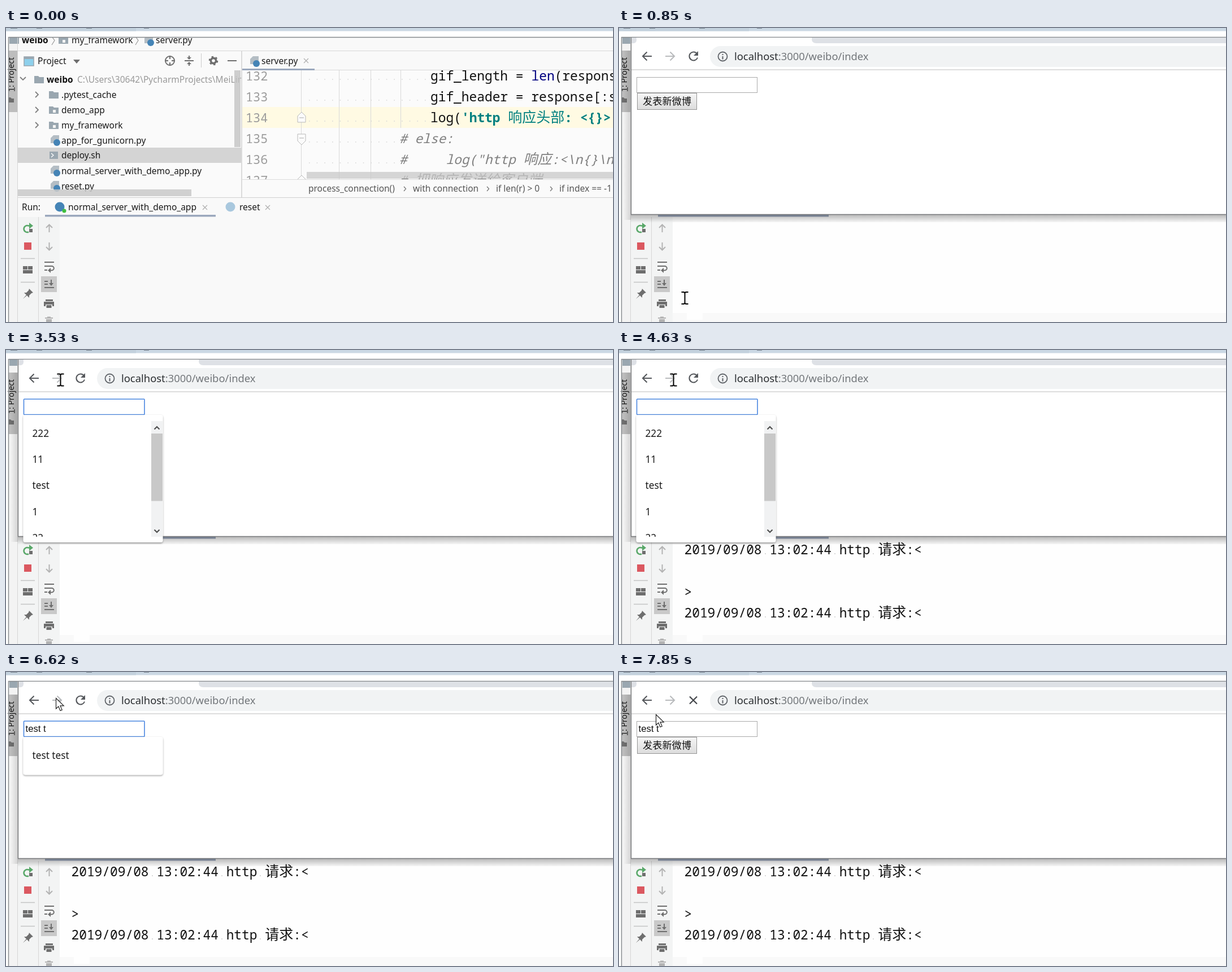
Recreate the animation shown at these times as an HTML page. Size 1074 by 521 pixels, loop 8000 ms.

```html
<!DOCTYPE html>
<html lang="zh">
<head>
<meta charset="utf-8">
<title>Server demo</title>
<style>
html, body { margin: 0; width: 100%; height: 100%; overflow: hidden; background: #fff; }
svg { display: block; width: 100vw; height: 100vh; }
text { white-space: pre; font-family: "Noto Sans", "Noto Sans CJK SC", "Noto Sans CJK", sans-serif; font-size: 15.5px; }
.mono { font-family: "Noto Sans Mono", "DejaVu Sans Mono", monospace; font-size: 22.85px; }
.cjk { font-family: "Noto Sans CJK SC", "Noto Sans CJK", sans-serif; font-weight: 300; }
.field { font-family: "Liberation Sans", Arial, sans-serif; font-size: 16.7px; }
</style>
</head>
<body>
<svg id="stage" viewBox="0 0 1074 521" xmlns="http://www.w3.org/2000/svg"></svg>
<script>
const LOOP = 8000;
const esc = s => s.replace(/&/g, '&amp;').replace(/</g, '&lt;').replace(/>/g, '&gt;');
const rect = (x, y, w, h, fill, more = '') =>
  `<rect x="${x}" y="${y}" width="${w}" height="${h}" fill="${fill}" ${more}/>`;
const text = (x, y, s, fill = '#1a1a1a', more = '') =>
  `<text x="${x}" y="${y}" fill="${fill}" ${more}>${esc(s)}</text>`;
const line = (d, color, w = 1, more = '') =>
  `<path d="${d}" fill="none" stroke="${color}" stroke-width="${w}" ${more}/>`;
const shape = (d, fill) => `<path d="${d}" fill="${fill}"/>`;
const dot = (x, y, r, fill) => `<circle cx="${x}" cy="${y}" r="${r}" fill="${fill}"/>`;

// Monospaced run in which CJK glyphs take their own wider advance.
function mono(x, y, s, fill, more = '') {
  return s.split(/([\u4e00-\u9fff]+)/).map(part => {
    const wide = /[\u4e00-\u9fff]/.test(part);
    const out = part && text(x, y, part, fill, wide
      ? `class="cjk" style="font-size:25px" ${more}` : `class="mono" ${more}`);
    x += part.length * (wide ? 25 : 13.71);
    return out;
  }).join('');
}

const GREY = '#6e6e6e', TREE = '#9aa7b0', BLUE = '#4584b6';
const folder = (x, y, mark) =>
  shape(`M${x} ${y - 6}h7l2 2h8v11h-17z`, TREE) + (mark ? rect(x + 7, y, 5, 5, '#f4f4f4') : '');
const pyFile = (x, y) => shape(`M${x + 5} ${y - 9}h10v14h-15v-9z`, '#b4bdc4') + dot(x + 11, y + 4, 6, BLUE);
const chevron = (x, y) => line(`M${x - 3} ${y - 5}l5 5-5 5`, '#808080', 1.8);
const close = (x, y) => line(`M${x - 4} ${y - 4}l8 8m0-8l-8 8`, '#b0b0b0', 1.3);

function topBar() {
  return rect(0, 0, 1074, 5.5, '#cbd8e4') + rect(0, 0, 230, 5.5, '#c3d1dd') +
    line('M8 0h12m34 0h10m78 0h10m92 0h9', '#5d6974', 1.6) +
    rect(4, 16, 1070, 505, '#f9f9f9') + rect(4, 17, 17, 504, '#f3f3f3') +
    '<g clip-path="url(#crumbs)">' + folder(6, 21) + text(28, 27, 'weibo', '#111', 'font-weight="700"') +
    line('M81 15l5 7-5 8M229 15l5 7-5 8', '#999', 1.2) +
    folder(93, 21, true) + text(116, 27, 'my_framework') +
    pyFile(245, 22) + text(265, 27, 'server.py') + '</g>' +
    rect(4, 40, 16, 109, '#bdbdbd') +
    text(0, 0, '1: Project', '#111', 'transform="translate(13.5 113) rotate(-90)" style="font-size:14px"') +
    line('M15 105v7', '#111') + shape('M4 123h4l2 2h4v7h-10z', GREY) +
    line('M4 16.5H1074M4.5 16V521', '#84888b', 1.4) + line('M20.5 17V521', '#d4d4d4');
}

function project() {
  const rows = [['.pytest_cache', 118, 0], ['demo_app', 145, 1], ['my_framework', 172, 1]];
  const files = [['app_for_gunicorn.py', 199], ['normal_server_with_demo_app.py', 253], ['reset.py', 280]];
  return rect(21, 41, 396, 259, '#fafafa') + line('M21 40.5H1074', '#d8d8d8') +
    rect(32, 51, 17, 16, '#8ed0ec', 'stroke="#9aa7b0" stroke-width="1.5"') + rect(32, 51, 17, 4, TREE) +
    text(56, 64, 'Project') + shape('M119 56h12l-6 7z', GREY) +
    `<g fill="none" stroke="${GREY}" stroke-width="2"><circle cx="290" cy="58" r="8"/>` +
    '<path d="M290 49v6m0 6v6m-9-9h6m6 0h6M316 58h16M324 49v5m0 8v5M392 58h16"/></g>' +
    shape('M320 52h8l-4 4zM320 64h8l-4-4z', GREY) + line('M345.5 45V70', '#ccc') +
    `<circle cx="367" cy="58" r="4.6" fill="none" stroke="${GREY}" stroke-width="3.6"/>` +
    `<circle cx="367" cy="58" r="7" fill="none" stroke="${GREY}" stroke-width="2.6" stroke-dasharray="3.4 3.93"/>` +
    '<g clip-path="url(#tree)">' + rect(21, 212, 396, 27, '#d4d4d4') +
    line('M25 87l5 5 5-5', '#808080', 1.8) + folder(50, 91) + text(72, 96.5, 'weibo', '#111', 'font-weight="700"') +
    text(126, 96.5, 'C:\\Users\\30642\\PycharmProjects\\MeiLin', '#999') +
    rows.map(([s, y, m]) => chevron(55, y) + folder(76, y, m) + text(98, y + 5.5, s)).join('') +
    files.map(([s, y]) => pyFile(79, y) + text(98, y + 5.5, s)).join('') +
    rect(77, 219, 15, 13, TREE) + line('M80 222l4 3.5-4 3.5', '#fff', 1.3) + text(98, 231, 'deploy.sh') +
    rect(404, 75, 11, 136, '#c4c4c4', 'opacity=".8"') + rect(21, 286, 307, 12, '#c9c9c9', 'opacity=".85"') +
    '</g>' + line('M417 41V300', '#d0d0d0', 1.5);
}

function editor() {
  const row = n => 85 + 37 * (n - 132), base = n => row(n) + 7.5;
  let out = rect(418, 41, 656, 34, '#f9f9f9') +
    pyFile(432, 59) + text(452, 64, 'server.py') + close(531, 58) +
    line('M418 74.5H1074', '#d8d8d8') + rect(418, 72, 128, 3, '#9ba8bd') +
    '<g clip-path="url(#code)">' + rect(418, 75, 656, 194, '#fbfbfb') + rect(418, 140, 656, 37, '#fffae3') +
    line('M522.5 75V268M589.5 75V268M645.5 75V268M698.5 75V177', '#d9d9d9');
  for (let n = 132; n < 138; n++) {
    out += text(424, base(n), String(n), '#9c9c9c', 'class="mono" style="font-size:21.8px"') +
      line(`M536 ${row(n) + 6}H${n < 135 ? 748 : 693}`, '#d5d5d5', 1.6, 'stroke-dasharray="1.6 12.07"');
  }
  const note = 'font-style="italic"', str = 'font-weight="700"';
  out += mono(751, base(132), 'gif_length = ', '#111') + mono(929.5, base(132), 'len', '#000080') +
    mono(970.5, base(132), '(response)', '#111') +
    mono(751, base(133), 'gif_header = response[:s', '#111') +
    mono(751, base(134), 'log(', '#111') + mono(806, base(134), "'http 响应头部: <{}>", '#008080', str) +
    mono(696, base(135), '# else:', '#808080', note) +
    mono(696, base(136), '#     log("http 响应:<\\n{}\\n', '#808080', note) +
    mono(696, base(137), '# 把响应发送给客户端', '#808080', note);
  const fold = 'fill="#fbfbfb" stroke="#b8b8b8"';
  out += `<path d="M516 167v-11l7-7 7 7v11zM516 188h14v12l-7 7-7-7zM516 275v-7l7-7 7 7v7z" ${fold}/>` +
    line('M519 159h8M519 195h8', '#aaa') +
    rect(532, 255, 542, 12, '#c9c9c9', 'opacity=".75"') + '</g>';
  const crumbs = [[535, 'process_connection()'], [720, 'with connection'], [867, 'if len(r) > 0'], [979, 'if index == -1']];
  return out + rect(418, 268, 656, 32, '#fafafa') + line('M418 268.5H1074', '#dcdcdc') +
    crumbs.map(([x, s]) => text(x, 290, s, '#555')).join('') +
    line('M704 281l3.5 4-3.5 4M851 281l3.5 4-3.5 4M963 281l3.5 4-3.5 4', '#777', 1.3);
}

function runPanel() {
  const up = '#b3b3b3';
  return rect(21, 300, 1053, 34, '#f9f9f9') + line('M21 300.5H1074', '#cfcfcf') +
    text(28, 323, 'Run:') + dot(95, 317, 8.5, BLUE) + dot(103, 324, 3.5, '#3fbf3f') +
    text(110, 323, 'normal_server_with_demo_app') + close(352, 318) +
    dot(397, 317, 8.5, '#a9c8de') + text(413, 323, 'reset') + close(463, 318) +
    rect(21, 335, 74, 186, '#f3f4f4') + line('M57.5 335V521', '#d6d6d6') +
    rect(69, 331, 302, 3.5, '#9ba8bd') +
    line('M40 361.5a6 6 0 1 1 0-11h3', '#59a869', 2.6) + shape('M41 345l7 5.5-7 5.5z', '#59a869') +
    rect(41, 356, 6, 6, GREY) + rect(32, 380, 13, 13, '#db5860') +
    line('M26 408.5h25M26 450.5h25', '#c4c4c4', 1.5) +
    rect(30, 422, 8, 6, GREY) + rect(39, 422, 8, 6, GREY) + rect(30, 429, 17, 6, GREY) +
    shape('M41 462l7 7-3 1-4 4v4l-4-4-7 6 6-7-4-4h4l4-4z', GREY) +
    line('M76.5 362v-13m-5.5 5l5.5-5.5 5.5 5.5M76.5 380v13m-5.5-5l5.5 5.5 5.5-5.5', up, 2) +
    line('M68 415h17M68 422h13a3.7 3.7 0 0 1 0 7.5h-3M68 429h5', GREY, 2) + shape('M79 425v9l-5-4.5z', GREY) +
    rect(62, 440, 28, 28, '#c9c9c9') +
    line('M68 449h6M68 454h6M68 460h17M80 446v8', GREY, 2) + shape('M76 452h8l-4 5z', GREY) +
    rect(70, 481, 13, 3, GREY) + shape('M67 485h18v8h-3v-3h-12v3h-3z', GREY) + rect(71.5, 491, 9, 5, GREY) +
    rect(69, 513, 14, 2, up) + rect(73, 511.5, 6, 2, up) + rect(71, 516, 10, 6, up);
}

function browser() {
  return rect(95, 344, 979, 161, '#fefefe') + rect(120, 504, 28, 13, '#fefefe') +
    rect(21, 331, 1053, 14, 'url(#below)') + rect(8, 40, 13, 300, 'url(#side)') +
    rect(21, 17, 1053, 314, '#fff') +
    shape('M341 17v2q0 8 8 8h725v-10z', '#dee1e6') + shape('M21 17h10v4q0 6-6 6h-4z', '#dee1e6') +
    line('M58 50H42m7.5-7.5L42 50l7.5 7.5', '#55585c', 2.1) +
    line('M82 50h16m-7.5-7.5L98 50l-7.5 7.5', '#b9bbbd', 2.1) +
    `<g id="reload">${line('M138 45.5a7.5 7.5 0 1 0 1 7', '#55585c', 2.1)}${shape('M140 41v8h-8z', '#55585c')}</g>` +
    `<g id="stop">${line('M125 43.5l13 13m0-13l-13 13', '#45484c', 2.2)}</g>` +
    rect(161, 32, 940, 37, '#f1f3f4', 'rx="18.5"') +
    '<circle cx="183.5" cy="50.5" r="8" fill="none" stroke="#5f6368" stroke-width="1.8"/>' +
    line('M183.5 46v2m0 2v5.5', '#5f6368', 2) +
    '<text x="204" y="57" style="font-size:18.4px" fill="#2b2e31">localhost<tspan fill="#72767a">:3000/weibo/index</tspan></text>' +
    line('M21 74H1074', '#d2d2d2', 1.5) +
    '<g id="button"><rect id="face" x="32.5" y="115.5" width="105" height="29" stroke="#949494"/>' +
    text(42, 136, '发表新微博', '#111', 'class="cjk" style="font-size:17.2px"') + '</g>' +
    '<rect id="box" fill="#fff"/>' + text(34.5, 106, '', '#111', 'class="field" id="typed"') +
    rect(0, 92, 1.3, 17, '#111', 'id="caret"') +
    line('M21.5 17V330.5H1074', '#77797b', 1.3);
}

const stage = document.getElementById('stage');
const clip = (id, x, y, w, h) => `<clipPath id="${id}">${rect(x, y, w, h, '#000')}</clipPath>`;
const down = 'x1="0" y1="0" x2="0" y2="1"';
const fade = (id, dir, a, b) =>
  `<linearGradient id="${id}" ${dir}><stop stop-opacity="${a}"/><stop offset="1" stop-opacity="${b}"/></linearGradient>`;
const face = (id, a, b) =>
  `<linearGradient id="${id}" ${down}><stop stop-color="${a}"/><stop offset="1" stop-color="${b}"/></linearGradient>`;
const beam = 'M-6-10.5h4.5l1.5 1.5 1.5-1.5h4.5M-6 10.5h4.5l1.5-1.5 1.5 1.5h4.5M0-9.5v19';

stage.innerHTML = '<defs>' + clip('crumbs', 5, 17, 1069, 23) + clip('tree', 21, 75, 395, 225) +
  clip('code', 418, 75, 656, 193) + clip('list', 30, 116, 248, 215) +
  fade('below', down, .26, 0) + fade('side', '', 0, .13) +
  face('idle', '#f6f6f6', '#dcdcdc') + face('hover', '#fafafa', '#e6e6e6') + face('pressed', '#dadada', '#eeeeee') +
  '<filter id="soft" x="-10%" y="-10%" width="120%" height="125%">' +
  '<feDropShadow dx="0" dy="1.5" stdDeviation="1.5" flood-opacity=".4"/></filter></defs>' +
  topBar() + project() + editor() + runPanel() +
  `<g id="browser">${browser()}</g><g id="log">` +
  [362, 474].map(y => mono(115.5, y, '2019/09/08 13:02:44 http 请求:<', '#111') +
    [259, 382, 450].map(x => dot(x, y - 1, 1, '#ccc')).join('')).join('') +
  mono(115.5, 437, '>', '#111') + '</g><g id="menu"></g>' +
  `<g id="beam">${line(beam, '#fff', 4, 'opacity=".7"')}${line(beam, '#000', 2)}</g>` +
  '<g id="arrow"><path d="M.5.5V19l4.3-4 3.2 7.5 3.2-1.4-3.2-7.3h6.2z" fill="#fff" stroke="#222" stroke-width="1.2"/></g>';

const $ = id => document.getElementById(id);
const show = (id, on) => $(id).style.display = on ? '' : 'none';
const set = (el, attrs) => Object.entries(attrs).forEach(([k, v]) => el.setAttribute(k, v));

// Each track lists [start time, value...]; the latest started entry holds.
const at = (track, t) => track.filter(e => e[0] <= t).pop();

const pointer = [
  [0, ''], [280, 'beam', 127, 507], [430, 'beam', 134, 499], [550, 'beam', 144, 491], [700, 'beam', 121, 491],
  [850, 'beam', 116.5, 478.5], [970, 'arrow', 303, 208], [1120, 'arrow', 266, 148], [1240, 'arrow', 238, 108],
  [1390, 'arrow', 180, 80], [1510, 'arrow', 122, 55], [1630, 'arrow', 92, 44], [1780, 'arrow', 94, 37],
  [1900, 'arrow', 97, 44], [2550, 'beam', 101.5, 51], [2950, 'beam', 102, 52], [3530, 'beam', 96.5, 53],
  [6620, 'arrow', 88, 46], [6770, 'arrow', 180, 78], [6890, 'arrow', 270, 110], [7160, 'arrow', 138, 109],
  [7310, 'arrow', 98, 96], [7430, 'arrow', 69, 84], [7580, 'arrow', 65, 75]
];
const typing = [[0, ''], [4750, 't'], [4870, 'te'], [5150, 'tes'], [5270, 'test'], [5800, 'test '], [5950, 'test t']];
const caret = [[0, false], [3100, true], [3530, false], [4040, true], [4630, false], [4750, true], [6500, false]];
const tests = ['test reply', 'test test', 'test content', 'test weibo'];
const menus = [
  [0, []], [3100, ['222', '11', 'test', '1', '22', '2']], [4870, ['test', ...tests]],
  [5800, tests], [6070, ['test test']], [7010, []]
];
const faces = [[0, 'idle'], [7580, 'hover'], [7700, 'pressed'], [7850, 'idle']];

function menu(items) {
  if (!items.length) return '';
  const long = items.length > 4, h = long ? 226 : 21 + 46.25 * items.length;
  const thumb = 162 * 205 / (46.3 * items.length);
  return rect(30.5, 115, 247, h, '#fff', 'rx="4" filter="url(#soft)"') + '<g clip-path="url(#list)">' +
    items.map((s, i) => text(46.5, 154 + 46.2 * i, s, '#1a1a1a', 'style="font-size:17.2px"')).join('') + '</g>' +
    (long ? rect(257, 126, 20, 205, '#f1f2f3') + rect(257, 148, 20, thumb, '#c8c8c8') +
      line('M262.5 140.5l4.5-4.5 4.5 4.5M262.5 318.5l4.5 4.5 4.5-4.5', '#505050', 2.2) : '');
}

let shown;
function draw(t) {
  show('browser', t >= 850);
  show('log', t >= 3650);
  show('reload', t < 7850);
  show('stop', t >= 7850);

  const focus = t >= 3100 && t < 7010;
  show('button', !focus);
  set($('box'), focus
    ? { x: 31.5, y: 87, width: 213.5, height: 27.5, stroke: '#4a86e0', 'stroke-width': 1.6, rx: 1 }
    : { x: 31.5, y: 87.5, width: 213, height: 27, stroke: '#a9a9a9', 'stroke-width': 1, rx: 0 });
  const typed = at(typing, t)[1];
  $('typed').textContent = typed;
  const widths = { t: .278, e: .556, s: .5, ' ': .278 };
  $('caret').setAttribute('x', 34.5 + 16.7 * [...typed].reduce((sum, c) => sum + widths[c], 0));
  show('caret', at(caret, t)[1]);
  $('face').setAttribute('fill', `url(#${at(faces, t)[1]})`);

  const items = at(menus, t)[1];
  if (items !== shown) $('menu').innerHTML = menu(shown = items);

  const [, kind, x, y] = at(pointer, t);
  for (const id of ['beam', 'arrow']) {
    show(id, id === kind);
    if (id === kind) $(id).setAttribute('transform', `translate(${x} ${y})`);
  }
}

const start = performance.now();
function tick() {
  draw((performance.now() - start) % LOOP);
  requestAnimationFrame(tick);
}
tick();
</script>
</body>
</html>
```
